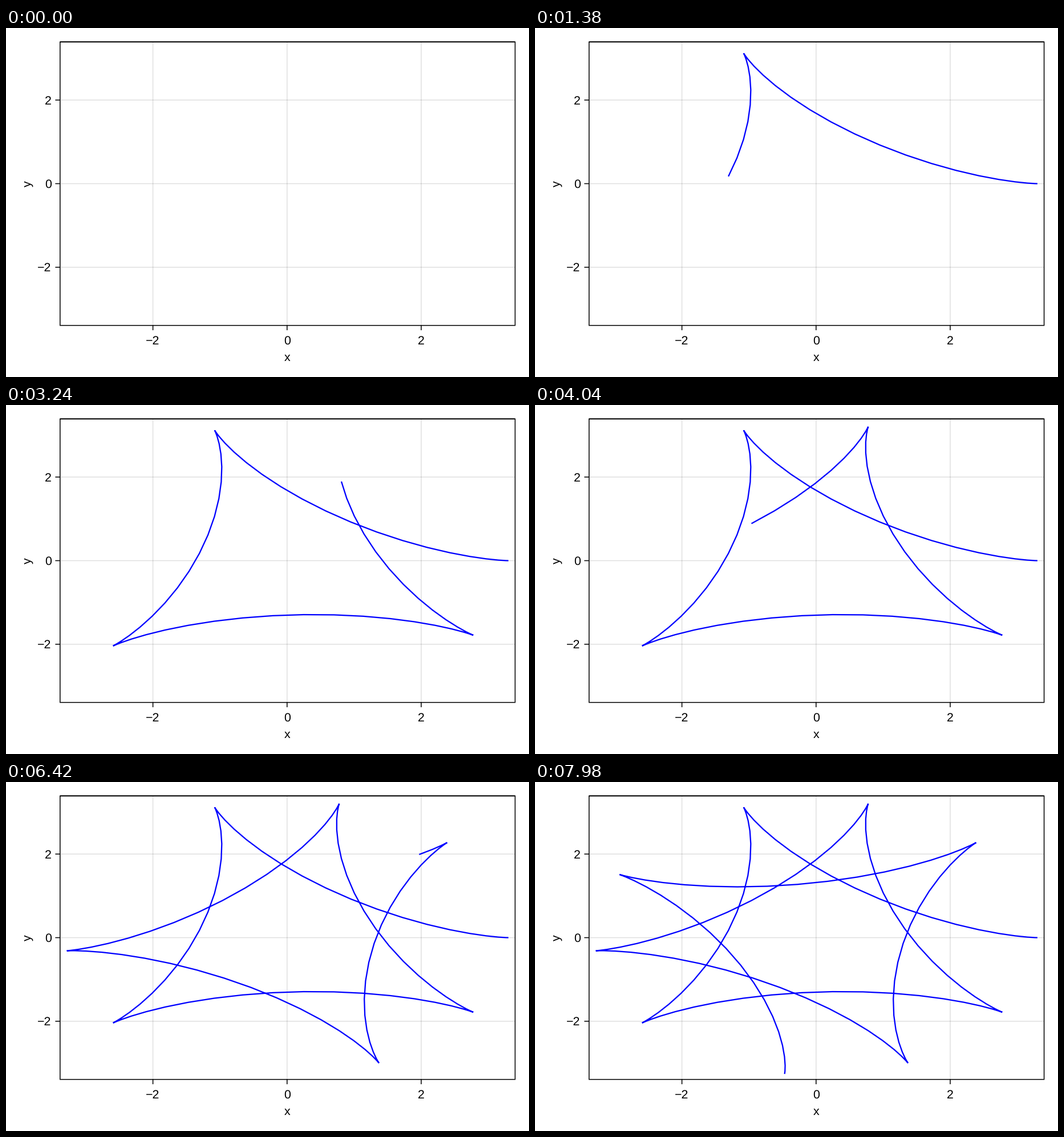
These frames come from a looping animation (917 by 611 pixels, 8000 ms). A matplotlib script:

```python
import numpy as np
import matplotlib.pyplot as plt
from matplotlib.animation import FuncAnimation

W, H, DPI = 917, 611, 64
PT = 72 / DPI                    # points per pixel
U = W / 600                      # layout unit in pixels
X0, Y0, SX, SY = 492.8, 272.5, 117.6, 73.17
LEFT, RIGHT, TOP, BOTTOM = 94.8, 892.6, 24.4, 520.7
R, r, STEP = 3.3, 1.0, 0.1       # hypocycloid radii and angle step

plt.rcParams["font.family"] = "Liberation Sans"
plt.rcParams["text.hinting"] = "none"

fig = plt.figure(figsize=(W / DPI, H / DPI), dpi=DPI, facecolor="white")
ax = fig.add_axes([0, 0, 1, 1])
ax.set(xlim=(0, W), ylim=(H, 0))
ax.axis("off")


def stroke(xs, ys, width=U, color="black", z=2, **kw):
    return ax.plot(xs, ys, color=color, lw=width * PT, zorder=z, snap=False,
                   solid_capstyle="butt", solid_joinstyle="miter", **kw)[0]


def label(x, y, s, ha="center", **kw):
    ax.text(x, y, s, ha=ha, va="baseline", fontsize=14 * U * PT, **kw)


for v in (-2, 0, 2):
    px, py = X0 + v * SX, Y0 - v * SY
    name = str(v).replace("-", "\u2212")
    stroke([px, px], [TOP, BOTTOM], color=(0, 0, 0, 0.12), z=1)
    stroke([LEFT, RIGHT], [py, py], color=(0, 0, 0, 0.12), z=1)
    stroke([px, px], [BOTTOM, BOTTOM + 5.5 * U])
    stroke([LEFT - 5.5 * U, LEFT], [py, py])
    label(px, 553.8, name)
    label(79.6, py + 7.6, name, ha="right")

stroke([LEFT, RIGHT, RIGHT, LEFT, LEFT, RIGHT],
       [TOP, TOP, BOTTOM, BOTTOM, TOP, TOP], z=4)
label(X0 + 0.4, 582.6, "x")
label(43.2, Y0, "y", rotation=90, rotation_mode="anchor")

theta = STEP * np.arange(180)
k = (R - r) / r
xs = X0 + SX * ((R - r) * np.cos(theta) + r * np.cos(k * theta))
ys = Y0 - SY * ((R - r) * np.sin(theta) - r * np.sin(k * theta))
curve = stroke([], [], 1.5 * U, "blue", 3)


def steps_at(frame):
    """Three steps per seven ticks: one held for five, two for one each."""
    if frame == 0:
        return 0
    cycle, tick = divmod(frame - 1, 7)
    return 3 * cycle + 1 + max(0, tick - 4)


def draw(frame):
    n = steps_at(frame)
    last = n + 1 if n else 0
    curve.set_data(xs[:last], ys[:last])
    return [curve]


anim = FuncAnimation(fig, draw, frames=400, interval=20, repeat=True,
                     repeat_delay=0, init_func=lambda: draw(0))
plt.show()
```
